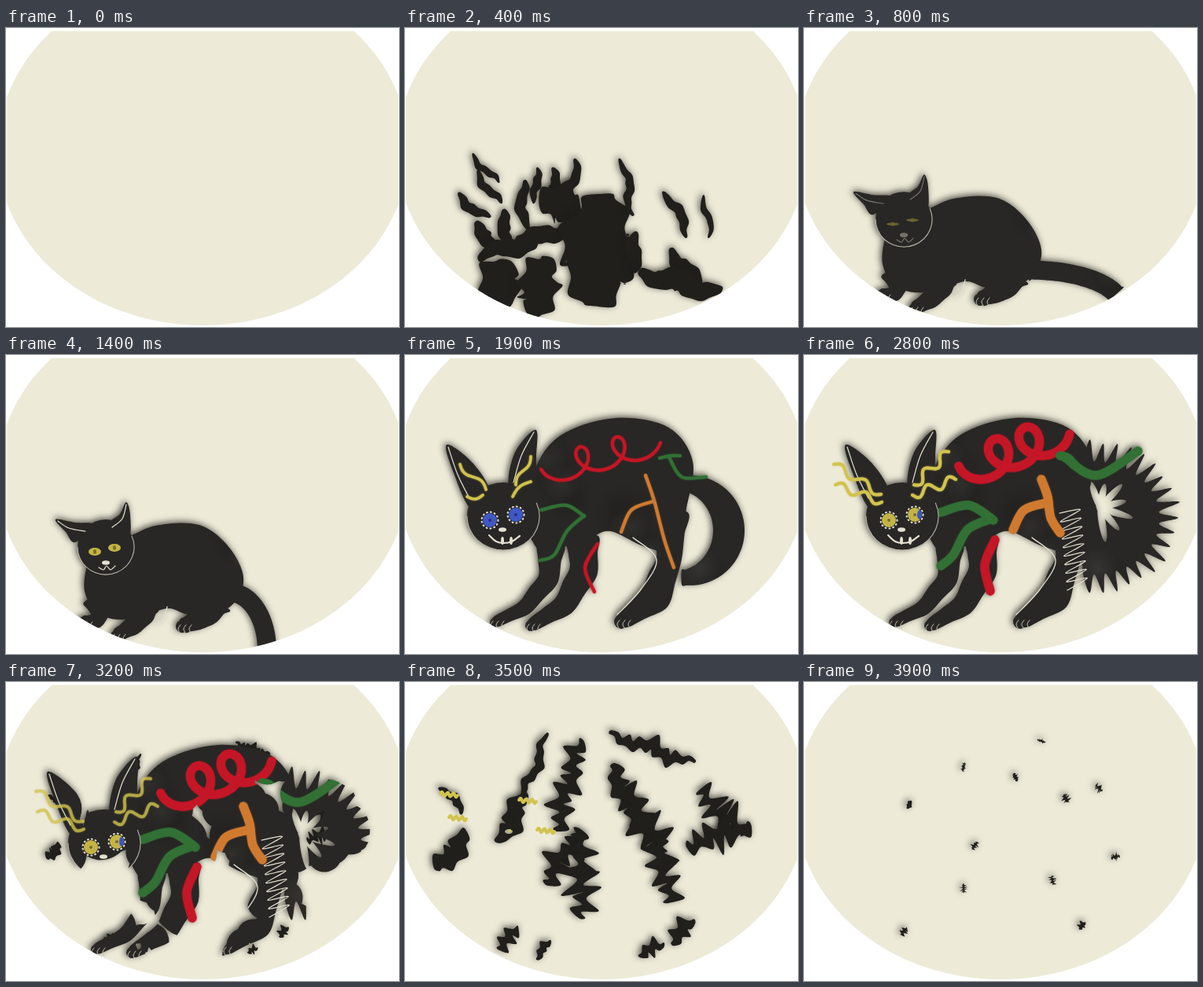
An HTML page with a canvas for the animation above (4 s loop, 500 by 380 pixels).

```html
<!DOCTYPE html>
<html lang="en">
<head>
<meta charset="utf-8">
<title>Ink cat</title>
<style>
html, body { margin: 0; width: 100%; height: 100%; overflow: hidden; background: #fff; }
canvas { display: block; }
</style>
</head>
<body>
<canvas id="stage" width="500" height="380"></canvas>
<script>
const W = 500, H = 380, INK = '#282725', PALE = '#e4e1d2';
const RED = '#c41626', GREEN = '#327035', ORANGE = '#d07a30', YELLOW = '#d2c350';
const { PI, sin, cos, floor, max, min, hypot } = Math;
const ctx = document.getElementById('stage').getContext('2d');
const layer = () => Object.assign(document.createElement('canvas'), { width: W, height: H }).getContext('2d');
const cat = layer(), mask = layer();

const ramp = (t, a, b) => max(0, min(1, (t - a) / (b - a)));
const ease = v => v * v * (3 - 2 * v);
const mix = (a, b, k) => a.map((v, i) => v + (b[i] - v) * k);
const noise = i => { const v = sin(i * 12.99) * 43758.5; return v - floor(v); };
const sample = (n, f) => Array.from({ length: n + 1 }, (_, i) => f(i / n, i)).flat();

// Smooth path through flat x,y pairs
function curve(p, closed) {
  const n = p.length / 2, path = new Path2D();
  const at = i => {
    i = closed ? (i + n) % n : max(0, min(n - 1, i));
    return [p[2 * i], p[2 * i + 1]];
  };
  path.moveTo(p[0], p[1]);
  for (let i = 0; i < (closed ? n : n - 1); i++) {
    const [a, b, c, d] = [at(i - 1), at(i), at(i + 1), at(i + 2)];
    path.bezierCurveTo(b[0] + (c[0] - a[0]) / 6, b[1] + (c[1] - a[1]) / 6,
      c[0] - (d[0] - b[0]) / 6, c[1] - (d[1] - b[1]) / 6, c[0], c[1]);
  }
  if (closed) path.closePath();
  return path;
}

// Band around spine(t), with half-width width(t, side, i)
function band(spine, width, n) {
  const left = [], right = [];
  for (let i = 0; i <= n; i++) {
    const t = i / n, [x, y] = spine(t), a = spine(max(0, t - .01)), b = spine(min(1, t + .01));
    const dx = b[0] - a[0], dy = b[1] - a[1], l = hypot(dx, dy) || 1;
    const p = width(t, 0, i), q = width(t, 1, i);
    left.push(x + dy / l * p, y - dx / l * p);
    right.unshift(x - dy / l * q, y + dx / l * q);
  }
  return curve(left.concat(right), true);
}

// Ragged brush smears: ends, half-width, spike length, resting point
const smears = [], strips = [];
const add = (list, x0, y0, x1, y1, w, spike, tx, ty) => {
  const x = (x0 + x1) / 2, y = (y0 + y1) / 2;
  list.push({ x, y, dx: x1 - x0, dy: y1 - y0, w, spike, to: tx ? [tx, ty] : null, seed: list.length * 31 });
};
const smear = (x0, y0, x1, y1, w) => add(smears, x0, y0, x1, y1, w, w > 20 ? 7 : 1.5);
const strip = (...v) => add(strips, ...v);

smear(87, 160, 117, 198, 4);
smear(92, 182, 120, 224, 5);
smear(67, 212, 106, 243, 6);
smear(88, 249, 117, 277, 9);
smear(122, 232, 134, 275, 8);
smear(149, 194, 152, 256, 7);
smear(166, 178, 167, 222, 5);
smear(187, 178, 190, 220, 6);
smear(217, 167, 210, 220, 6);
smear(172, 224, 224, 228, 22);
smear(93, 291, 214, 253, 12);
smear(244, 212, 248, 354, 42);
smear(277, 166, 290, 238, 5);
smear(332, 207, 361, 264, 6);
smear(382, 213, 387, 266, 4);
smear(295, 260, 289, 310, 9);
smear(338, 281, 375, 328, 9);
smear(298, 311, 402, 337, 14);
smear(126, 295, 122, 352, 24);
smear(180, 291, 162, 366, 21);

strip(182, 66, 148, 152, 5, 2);
strip(154, 142, 120, 205, 11, 4, 134, 156);
strip(224, 74, 192, 189, 8, 11, 203, 108);
strip(260, 66, 368, 104, 7, 6, 302, 75);
strip(262, 106, 302, 188, 11, 9, 269, 121);
strip(286, 150, 326, 216, 12, 15, 333, 148);
strip(317, 198, 338, 280, 8, 16, 316, 252);
strip(372, 140, 432, 194, 8, 17, 375, 135);
strip(440, 182, 358, 208, 9, 13, 396, 222);
strip(224, 188, 178, 256, 9, 12, 217, 208);
strip(222, 192, 226, 300, 8, 16, 203, 262);
strip(47, 132, 73, 167, 5, 2);
strip(80, 191, 42, 240, 12, 7);
strip(146, 316, 116, 336, 6, 7, 127, 317);
strip(187, 331, 168, 352, 5, 4);
strip(369, 305, 338, 331, 8, 6, 354, 310);
strip(329, 334, 299, 349, 6, 6);

function smearPath(s, k, ox = 0, oy = 0) {
  const l = hypot(s.dx, s.dy), wide = Math.pow(k, .75);
  const spine = t => {
    const bend = 4 * k * sin(t * l / 9 + s.seed) / l;
    return [s.x + ox + (t - .5) * s.dx * k - s.dy * bend, s.y + oy + (t - .5) * s.dy * k + s.dx * bend];
  };
  const width = (t, side, i) => {
    const spike = s.spike * ((i + side) % 2 ? .3 + 1.3 * noise(s.seed + i * 2 + side) : -.35);
    return max(.4, (s.w + spike) * wide * Math.pow(sin(PI * (.04 + .92 * t)), .6));
  };
  return band(spine, width, max(6, floor(l / 8)));
}

// Poses: lying and standing
const bodyLie = [100,300, 112,250, 158,230, 190,217, 235,214, 265,226, 292,256, 302,290, 282,322, 235,330, 205,322, 165,335, 125,332];
const bodyUp = [172,250, 152,200, 170,135, 205,98, 270,80, 335,92, 366,135, 358,195, 344,248, 306,244, 262,224, 236,232, 205,243];
const legs = [
  [[262,312,24, 254,328,18, 240,338,13, 224,345,8], [335,200,24, 336,258,16, 318,308,20, 275,339,9]],
  [[180,318,14, 175,330,14, 160,345,12, 140,357,7], [226,230,19, 227,275,18, 202,318,14, 160,344,7]],
  [[112,308,14, 120,325,14, 114,338,10, 98,341,8], [186,240,16, 182,285,13, 152,321,10, 114,340,6]]
];
const skull = [[127,244,36,35], [125,205,46,43]];
const ears = [
  [[88,238, 76,225, 63,209, 88,213, 112,216], [84,195, 62,150, 53,114, 86,137, 108,175]],
  [[132,215, 145,202, 153,187, 158,203, 156,232], [133,172, 139,126, 166,95, 167,130, 163,185]]
];
// Tail arcs: centre, radii, end angle, half-width, bulge
const tailOut = [286, 350, 122, 42, -.35, 12, 0], tailLie = [285, 375, 47, 73, .2, 12, 0];
const tailUp = [352, 223, 60, 60, PI / 2, 9, 11], tailFat = [355, 207, 74, 58, PI / 2, 17, 10];

// Painted marks: thin and thick version
const marks = [];
const mark = (color, thin, thick) => marks.push({ color, thin, thick });
const loops = (x, y, step, r, drop) => sample(40, u => {
  const t = -1.5 + u * 15.7;
  return [x + step * t + r * sin(t), y - drop * t + r * cos(t)];
});
const wave = (x0, y0, x1, y1, amp, turns = 2) => sample(14, u => {
  const l = hypot(x1 - x0, y1 - y0), s = amp * sin(u * turns * 2 * PI) / l;
  return [x0 + (x1 - x0) * u + (y1 - y0) * s, y0 + (y1 - y0) * u - (x1 - x0) * s];
});
mark(RED, loops(202, 141, 7.4, 18, 2), loops(228, 136, 6.2, 22, 2.4));
mark(GREEN, [172,261, 190,254, 206,224, 228,204], [174,268, 190,254, 208,222, 238,208]);
mark(GREEN, [173,197, 205,191, 228,205], [174,200, 210,191, 241,210]);
mark(RED, [245,240, 229,270, 241,301], [243,235, 230,267, 237,300]);
mark(ORANGE, [306,153, 317,185, 330,235, 342,270], [302,158, 310,180, 314,207, 326,226]);
mark(ORANGE, [316,186, 288,197, 275,225], [308,188, 280,197, 266,222]);
mark(GREEN, [324,131, 338,128, 350,128], [326,128, 336,131, 344,140]);
mark(GREEN, [336,130, 352,155, 383,155], [332,130, 372,153, 425,122]);
mark(YELLOW, wave(70, 139, 103, 171, -4, 1), wave(38, 139, 98, 177, 5));
mark(YELLOW, wave(79, 180, 99, 178, -4, .5), wave(40, 165, 99, 187, 5));
mark(YELLOW, wave(160, 129, 141, 165, 3, 1), wave(184, 123, 140, 165, -6));
mark(YELLOW, wave(160, 161, 137, 180, -4, .5), wave(193, 158, 138, 178, -6));

function line(c, path, color, width) {
  c.strokeStyle = color;
  c.lineWidth = width;
  c.lineCap = c.lineJoin = 'round';
  c.stroke(path);
}
function oval(c, x, y, rx, ry, color) {
  c.fillStyle = color;
  c.beginPath();
  c.ellipse(x, y, rx, ry, 0, 0, 7);
  c.fill();
}

function drawMarks(c, yellow, t, fat) {
  const g = ramp(t, 1500, 1900);
  if (!g) return;
  c.save();
  c.shadowBlur = 2;
  for (const m of marks) {
    if ((m.color === YELLOW) !== yellow) continue;
    const p = mix(m.thin, m.thick, fat), n = max(2, Math.ceil(p.length / 2 * g));
    c.shadowColor = m.color;
    line(c, curve(p.slice(0, 2 * n)), m.color, yellow ? 3.5 + fat * .5 : 4 + fat * 7);
  }
  c.restore();
}

function drawLeg(c, [lie, up], k) {
  const s = mix(lie, up, k);
  const at = (t, a) => {
    const i = min(2, floor(t * 3)), f = ease(t * 3 - i);
    return s[3 * i + a] + (s[3 * i + 3 + a] - s[3 * i + a]) * (a > 1 ? f : t * 3 - i);
  };
  c.fill(band(t => [at(t, 0), at(t, 1)], t => at(t, 2), 6));
  const [x, y, r] = s.slice(9);
  oval(c, x, y, r, r, INK);
  for (let i = 0; i < 3; i++) {
    const cx = x - 4 + i * 7;
    line(c, curve([cx + 2, y - 2, cx - 1, y + 3, cx + 1, y + 8]), '#c9c6b8', 1);
  }
}

function drawTail(c, t, up, fat) {
  const pose = mix(mix(mix(tailOut, tailLie, ease(ramp(t, 700, 1300))), tailUp, up), tailFat, fat);
  const [x, y, rx, ry, end, w, bulge] = pose;
  const sway = sin((t - 2800) / 130) * 4 * fat;
  const spine = u => {
    const a = -PI / 2 + (end + PI / 2) * u;
    return [x + rx * cos(a), y + ry * sin(a) + sway * u];
  };
  const width = (u, side, i) => {
    const spike = side ? 0 : fat * (i % 2 ? 17 + 8 * noise(i) : -4);
    return w + bulge * sin(PI * u) + spike;
  };
  c.fill(band(spine, width, 38));
  if (fat < .3) return;
  oval(c, 375, 207, 50 * fat, 62 * fat, INK);
  // Pale splayed fingers inside the tail
  c.globalCompositeOperation = 'destination-out';
  for (let i = 0; i < 7; i++) {
    const a = -1.9 + i * .55, r = (17 + 9 * noise(i + 3)) * fat;
    c.beginPath();
    c.ellipse(376 + r * .8 * cos(a), 194 + r * .8 * sin(a), r, 4.5 * fat, a, 0, 7);
    c.fill();
  }
  c.globalCompositeOperation = 'source-over';
}

function drawFace(c, t, up, fat) {
  const open = ramp(t, 600, 1100), pose = (a, b) => mix(a, b, up);
  const stroke = (a, b, w) => line(c, curve(pose(a, b)), PALE, w);
  c.globalAlpha = open;
  stroke([66,211, 80,220, 101,224], [55,117, 67,152, 82,182], 1.2);
  stroke([153,190, 148,208, 135,219], [164,98, 148,128, 138,162], 1.2);
  const eyes = pose([113,250, 138,245], [108,210, 141,203]);
  for (let i = 0; i < 2; i++) {
    const x = eyes[2 * i], y = eyes[2 * i + 1], blue = up > .6 && fat < .5;
    const rx = 8 + up, ry = (5 + 4 * up) * open;
    if (up > .3) {
      const ring = new Path2D();
      ring.ellipse(x, y, rx + 1.5, ry + 1.5, 0, 0, 7);
      c.setLineDash([1, 4]);
      line(c, ring, PALE, 2);
      c.setLineDash([]);
    }
    oval(c, x, y, rx, ry, blue ? '#4058c4' : '#c4b446');
    if (fat > .5 && i) oval(c, x + 6, y, 3, 6, '#3d55b8');
    oval(c, x, y, 2, 3 - up, blue ? '#26317c' : '#77702b');
  }
  oval(c, ...pose([127, 264], [124, 222]), 5, 2.8, PALE);
  stroke([118,270, 124,273, 128,268, 133,273, 139,268], [107,229, 116,237, 126,239, 136,237, 146,230], 1.2 + up);
  if (up > .5) for (const x of [121, 132]) oval(c, x + 3, 236, 2, 5, PALE);
  c.globalAlpha = 1;
}

function drawCat(t, up, fat) {
  const c = cat;
  c.globalCompositeOperation = 'source-over';
  c.clearRect(0, 0, W, H);
  c.fillStyle = INK;
  drawTail(c, t, up, fat);
  c.fillStyle = INK;
  c.fill(curve(mix(bodyLie, bodyUp, up), true));
  for (const leg of legs) drawLeg(c, leg, up);

  // Uneven wash
  c.globalCompositeOperation = 'source-atop';
  for (let i = 0; i < 14; i++) {
    const x = 110 + i * 97 % 300, y = 110 + i * 71 % 230, r = 22 + i * 13 % 25;
    const g = c.createRadialGradient(x, y, 0, x, y, r);
    const tone = i % 2 ? '16,16,14' : '95,94,88';
    g.addColorStop(0, `rgba(${tone},.28)`);
    g.addColorStop(1, `rgba(${tone},0)`);
    c.fillStyle = g;
    c.fillRect(x - r, y - r, 2 * r, 2 * r);
  }
  c.globalCompositeOperation = 'source-over';
  line(c, curve(mix([205,320, 203,328, 200,336, 192,343], [290,232, 320,260, 300,298, 270,330], up)), PALE, 1.3);
  if (fat) {
    c.globalAlpha = fat;
    line(c, curve(sample(18, (u, i) => [338 + (i % 2 ? 13 : -13) + 10 * u, 196 + 98 * u + (i % 2 ? -5 : 5)])), PALE, 1.2);
    c.globalAlpha = 1;
  }
  drawMarks(c, false, t, fat);

  c.save();
  if (t < 1400) c.translate(0, 2 * sin((t - 1400) / 700 * PI));
  const [x, y, rx, ry] = mix(...skull, up), chin = new Path2D();
  c.fillStyle = INK;
  for (const [lie, stand] of ears) c.fill(curve(mix(lie, stand, up), true));
  oval(c, x, y, rx, ry, INK);
  chin.ellipse(x, y, rx, ry, 0, -.4, PI);
  line(c, chin, '#b9b6a9', 1.1);
  drawFace(c, t, up, fat);
  c.restore();
}

function keepNear(list, spread) {
  mask.clearRect(0, 0, W, H);
  for (const s of list) {
    const p = smearPath(s, 1);
    mask.fill(p);
    line(mask, p, '#000', spread);
  }
  cat.globalCompositeOperation = 'destination-in';
  cat.drawImage(mask.canvas, 0, 0);
}

function halo(blur) {
  ctx.shadowColor = 'rgba(30,28,24,.75)';
  ctx.shadowBlur = blur;
  ctx.shadowOffsetX = ctx.shadowOffsetY = -2;
}

function drawSmears(t) {
  const grow = ramp(t, 0, 400), away = 1 - grow;
  const k = t <= 400 ? Math.pow(grow, 1.3) : 1 - (t - 400) / 350;
  for (const s of smears) ctx.fill(smearPath(s, k, (s.x - 230) * .25 * away, (s.y - 270) * .8 * away));
}

function drawStrips(t) {
  const form = ramp(t, 3000, 3500), fade = ramp(t, 3500, 3900), move = ease(fade);
  for (const s of strips) {
    const [x, y] = s.to || [s.x, s.y], small = s.to ? 11 / hypot(s.dx, s.dy) : 0;
    const k = form * (1 - fade * (1 - small));
    if (k > .02) ctx.fill(smearPath(s, k, (x - s.x) * move, (y - s.y) * move));
  }
}

function drawScraps(k) {
  for (const [x, y] of [[56, 143], [67, 173], [156, 151], [179, 189]])
    line(ctx, curve(wave(x - 11 * k, y - 1, x + 11 * k, y + 1, 2.5 * k, 3)), YELLOW, 4 * k);
  oval(ctx, 132, 190, 5 * k, 3 * k, '#aaa99f');
  oval(ctx, 133, 189, 2 * k, 2 * k, YELLOW);
}

function draw(t) {
  ctx.fillStyle = '#fff';
  ctx.fillRect(0, 0, W, H);
  ctx.save();
  ctx.beginPath();
  ctx.rect(1, 4, 498, 374);
  ctx.clip();
  ctx.beginPath();
  ctx.ellipse(250.5, 155, 261.5, 223, 0, 0, 7);
  ctx.clip();
  ctx.fillStyle = '#edead8';
  ctx.fillRect(0, 0, W, H);

  ctx.save();
  halo(9);
  ctx.fillStyle = '#201f1c';
  if (t > 0 && t < 700) drawSmears(t);
  if (t > 3000) drawStrips(t);
  ctx.restore();
  if (t > 400 && t < 3500) {
    const up = ease(ramp(t, 1400, 1850)), fat = ease(ramp(t, 1950, 2700));
    drawCat(t, up, fat);
    if (t < 700) keepNear(smears, (t - 400) / 5);
    if (t > 3000) keepNear(strips, (3500 - t) / 7);
    ctx.save();
    halo(9);
    ctx.drawImage(cat.canvas, 0, 0);
    ctx.restore();
    ctx.globalAlpha = 1 - ramp(t, 3000, 3500);
    drawMarks(ctx, true, t, fat);
    ctx.globalAlpha = 1;
  }
  if (t > 3200 && t < 3800) drawScraps(t <= 3500 ? ramp(t, 3200, 3500) : 1 - ramp(t, 3500, 3800));
  ctx.restore();
}

const start = performance.now();
let last = -1;
function tick() {
  const t = floor((performance.now() - start) % 4000 / 100) * 100;
  if (t !== last) draw(last = t);
  requestAnimationFrame(tick);
}
tick();
</script>
</body>
</html>
```
